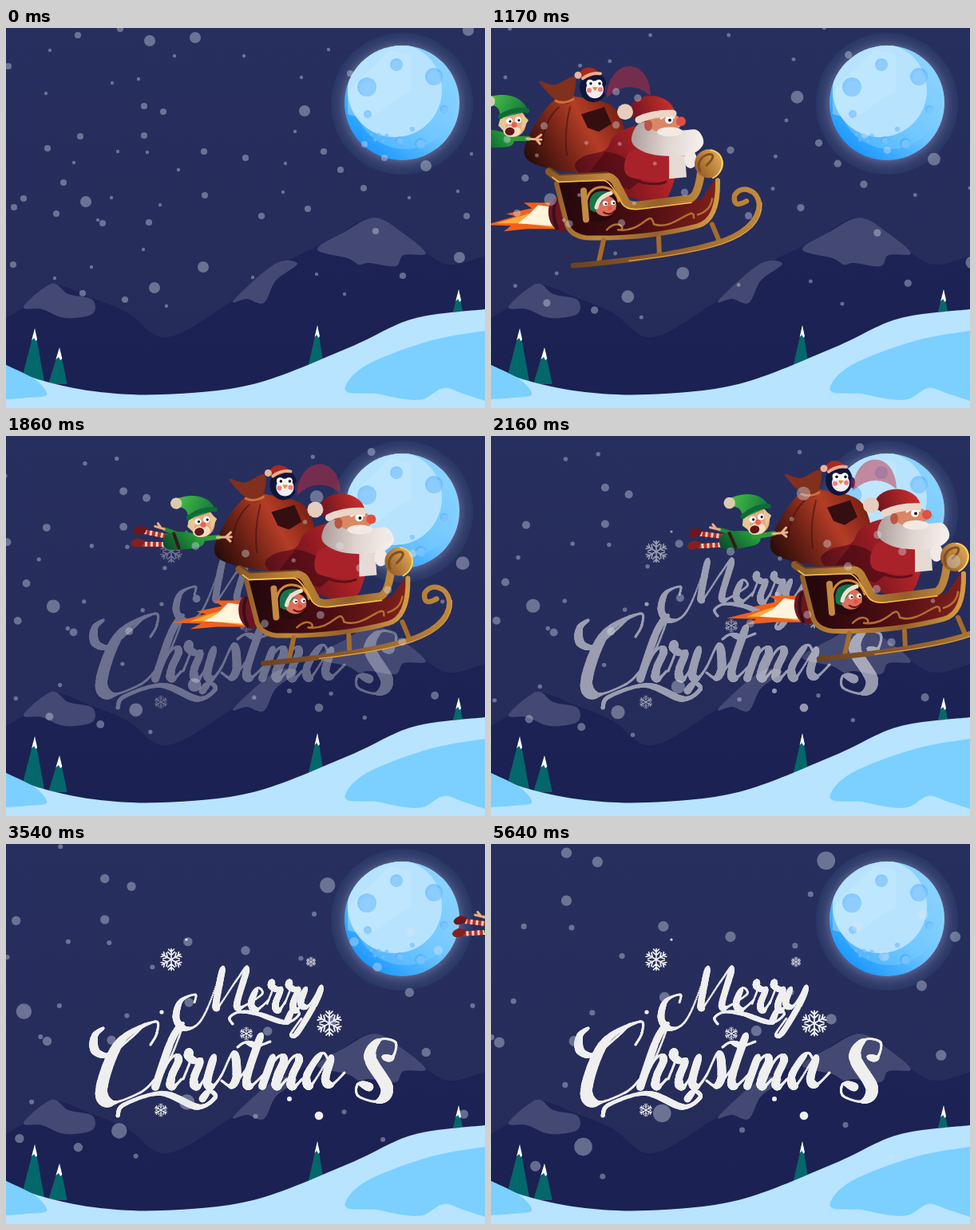
An HTML page with a canvas for the animation above (5.67 s loop, 600 px wide and 477 px high).

```html
<!DOCTYPE html>
<html lang="en">
<head>
<meta charset="utf-8">
<title>Merry Christmas</title>
<style>
html, body { margin: 0; width: 100%; height: 100%; overflow: hidden; background: #262d5b; }
canvas { display: block; }
</style>
</head>
<body>
<canvas id="stage" width="600" height="477" role="img" aria-label="Merry Christmas"></canvas>
<script>
const W = 600, H = 477, LOOP = 5670, STEP = 30, TAU = Math.PI * 2;
const stage = document.getElementById('stage').getContext('2d');
let g = stage;

function layer(draw) {
  const c = document.createElement('canvas');
  c.width = W; c.height = H;
  g = c.getContext('2d');
  draw();
  g = stage;
  return c;
}
function fill(d, color) { g.fillStyle = color; g.fill(new Path2D(d)); }
function line(d, color, width) {
  g.strokeStyle = color; g.lineWidth = width;
  g.lineCap = g.lineJoin = 'round';
  g.stroke(new Path2D(d));
}
function oval(x, y, rx, ry, color, turn = 0) {
  g.fillStyle = color;
  g.beginPath(); g.ellipse(x, y, rx, ry, turn, 0, TAU); g.fill();
}
const dot = (x, y, r, color) => oval(x, y, r, r, color);
function eye(x, y, r) { dot(x, y, r, '#fff'); dot(x + 1, y + .5, r * .4, '#111'); }
function blend(x0, y0, x1, y1, ...colors) {
  const b = g.createLinearGradient(x0, y0, x1, y1);
  colors.forEach((c, i) => b.addColorStop(i / (colors.length - 1), c));
  return b;
}
// Smooth curve through points
function curve(p, closed) {
  const n = p.length / 2, path = new Path2D();
  const at = (i, k) => p[2 * (closed ? (i + n) % n : Math.max(0, Math.min(n - 1, i))) + k];
  path.moveTo(p[0], p[1]);
  for (let i = 0; i < (closed ? n : n - 1); i++) {
    const c = (a, b, d, k) => at(a, k) + (at(b, k) - at(d, k)) / 6;
    path.bezierCurveTo(c(i, i + 1, i - 1, 0), c(i, i + 1, i - 1, 1),
      c(i + 1, i, i + 2, 0), c(i + 1, i, i + 2, 1), at(i + 1, 0), at(i + 1, 1));
  }
  return path;
}
function blob(color, ...p) { g.fillStyle = color; g.fill(curve(p, true)); }
function ground(color, ...p) {
  const path = curve(p);
  path.lineTo(W, H); path.lineTo(0, H);
  g.fillStyle = color; g.fill(path);
}
// Smooth interpolation through [time, value] keys
function ease(keys, t) {
  const n = keys.length - 1;
  if (t <= keys[0][0]) return keys[0][1];
  if (t >= keys[n][0]) return keys[n][1];
  let i = 0;
  while (t > keys[i + 1][0]) i++;
  const slope = k => {
    const a = keys[Math.max(0, k - 1)], b = keys[Math.min(n, k + 1)];
    return (b[1] - a[1]) / (b[0] - a[0]);
  };
  const [t0, v0] = keys[i], [t1, v1] = keys[i + 1];
  const d = t1 - t0, u = (t - t0) / d, w = u * u * (3 - 2 * u);
  return v0 * (1 - w) + v1 * w + d * u * (1 - u) * ((1 - u) * slope(i) - u * slope(i + 1));
}

/* ---------- landscape ---------- */
function crater(x, y, r) {
  dot(x, y, r, 'rgba(60,160,250,.42)');
  dot(x + r * .12, y + r * .15, r * .82, 'rgba(150,210,255,.5)');
}
function moon() {
  const halo = g.createRadialGradient(496, 95, 70, 496, 95, 89);
  halo.addColorStop(0, 'rgba(120,130,175,.6)');
  halo.addColorStop(.5, 'rgba(75,90,135,.45)');
  halo.addColorStop(1, 'rgba(45,80,125,.28)');
  dot(496, 95, 89, halo);
  g.save();
  g.beginPath(); g.arc(496, 94, 72, 0, TAU); g.clip();
  dot(496, 94, 73, blend(540, 40, 445, 150, '#9bd8ff', '#6fc4ff', '#1897ff'));
  oval(500, 84, 66, 68, 'rgba(120,205,255,.5)');
  dot(487, 78, 59, '#b7e3ff');
  fill('M428 108Q455 118 474 101T507 80V33L480 28L428 80Z', 'rgba(200,234,255,.4)');
  crater(489, 46, 8); crater(536, 61, 11); crater(452, 74, 12); crater(453, 108, 5);
  crater(549, 102, 5); crater(519, 145, 7); crater(493, 141, 5); crater(509, 127, 3);
  for (let i = 0; i < 5; i++) crater(457 + i * 5, 133 + (i * 7) % 13, 2.5);
  g.restore();
}
function tree(x, y, w, h) {
  fill(`M${x} ${y}l${-w} ${h}h${w * 1.7}Z`, '#04676b');
  const k = 15 * w / h;
  fill(`M${x} ${y}l${-k} 15l${k * .8} -3l2 4l${k * .5} -2Z`, '#fff');
}
const land = layer(() => {
  g.fillStyle = blend(0, 0, 0, 360, '#272f5e', '#262c5a');
  g.fillRect(0, 0, W, H);
  moon();
  ground(blend(0, 240, 0, 440, '#1d2455', '#1b2152'), 0, 364, 24, 349, 57, 322, 103, 337, 152, 357, 202, 388,
    284, 342, 348, 295, 406, 267, 462, 238, 524, 281, 557, 297, 600, 286);
  const cap = '#444973';
  blob(cap, 22, 350, 57, 321, 78, 334, 108, 341, 108, 359, 74, 364, 45, 353);
  blob(cap, 285, 342, 337, 296, 365, 296, 338, 317, 323, 345, 302, 340);
  blob(cap, 390, 278, 424, 256, 462, 238, 498, 258, 526, 283, 498, 285, 488, 299, 455, 295, 442, 297, 428, 289);
  tree(36, 377, 17, 66);
  tree(67, 401, 14, 46);
  tree(390, 373, 12, 54);
  tree(567, 328, 7, 28);
  ground('#b8e4ff', 0, 423, 40, 441, 110, 456, 196, 460, 310, 447, 430, 401, 510, 365, 600, 353);
  const ice = '#7bd0ff';
  g.fillStyle = ice;
  g.fill(curve([0, 423, 36, 441, 51, 460, 28, 464, 0, 466]));
  g.fill(curve([600, 380, 530, 393, 450, 424, 425, 455, 464, 459, 493, 465, 522, 466, 548, 452, 572, 459, 600, 468]));
});

/* ---------- lettering ---------- */
// Pen stroke: downstrokes are thick, upstrokes thin
function pen(p, thick = 11, thin = 3, ox = 0, oy = 0, size = 1) {
  const n = p.length / 2, at = (i, k) => p[2 * Math.max(0, Math.min(n - 1, i)) + k] * size + (k ? oy : ox);
  let px, py, w = thin;
  for (let i = 0; i < n - 1; i++) for (let s = 0; s <= 24; s++) {
    const u = s / 24;
    const [x, y] = [0, 1].map(k => {
      const a = at(i - 1, k), b = at(i, k), c = at(i + 1, k), d = at(i + 2, k);
      return b + u * (c - a + u * (2 * a - 5 * b + 4 * c - d + u * (3 * (b - c) + d - a))) / 2;
    });
    if (px !== undefined) {
      const dx = x - px, dy = y - py, l = Math.hypot(dx, dy) || 1;
      const push = Math.max(0, Math.min(1, (dy + .25 * dx) / l));
      w += (thin + (thick - thin) * push - w) * Math.min(1, l * .3);
    }
    dot(x, y, w / 2, '#efefef');
    px = x; py = y;
  }
}
const hump = x => pen([0, 0, 13, -29, 23, -38, 26, -31, 18, -13, 16, 0, 21, 1, 30, -8], 11, 3, x, 303);
const rune = (x, y, size) =>
  pen([0, -8, 9, -31, 11, -42, 7, -45, 6, -37, 14, -31, 22, -32, 14, -11, 14, 0, 20, 1, 29, -12], 11 * size, 3 * size, x, y, size);

function merry() {
  pen([236, 199, 237, 189, 219, 197, 213, 218, 222, 231, 238, 228, 252, 207, 272, 154], 9, 2.6);
  pen([272, 154, 267, 178, 264, 206, 288, 172, 302, 155, 289, 203, 303, 201], 9, 2.6);
  pen([303, 201, 321, 188, 315, 181, 307, 200, 314, 208, 329, 196], 9, 2.6);
  rune(327, 207, .8);
  rune(349, 207, .8);
  pen([376, 180, 369, 200, 379, 203, 395, 178, 386, 202, 364, 238, 357, 238, 370, 219], 9, 2.6);
  pen([284, 226, 280, 218, 292, 211, 315, 213, 350, 224, 367, 214, 360, 207, 352, 223], 9, 3);
}
function christmas() {
  pen([122, 231, 111, 241, 112, 260, 130, 264, 158, 242, 174, 226]);
  pen([181, 252, 189, 237, 186, 223, 143, 248, 120, 305, 130, 325, 168, 312, 186, 296], 16);
  pen([140, 341, 148, 327, 195, 313, 240, 330, 262, 318, 255, 310, 246, 320], 11, 5);
  pen([186, 297, 206, 268, 222, 225, 207, 247, 187, 305]);
  hump(190);
  rune(222, 303, 1);
  pen([261, 265, 252, 298, 259, 304, 270, 290, 285, 261, 289, 290, 282, 304, 270, 297]);
  pen([288, 300, 306, 276]);
  pen([320, 238, 302, 292, 306, 304, 323, 289]);
  pen([290, 255, 300, 249, 315, 253, 331, 248]);
  pen([335, 265, 321, 304]);
  hump(322);
  hump(341);
  pen([403, 269, 395, 263, 377, 290, 382, 303, 407, 266, 400, 295, 408, 302, 424, 287]);
  pen([472, 267, 484, 268, 488, 249, 468, 246, 456, 268, 477, 306, 466, 323, 441, 316, 441, 301, 455, 305], 16);
}
function flake(x, y, r) {
  for (let i = 0; i < 6; i++) {
    g.save();
    g.translate(x, y); g.rotate(i * TAU / 6); g.scale(r, r);
    line('M0 0V-1M-.25 -.95L0 -.7L.25 -.95M-.32 -.7L0 -.4L.32 -.7', '#efefef', .12);
    g.restore();
  }
}
const greeting = layer(() => {
  merry();
  christmas();
  flake(207, 145, 13.5); flake(405, 225, 15.5); flake(382, 148, 6);
  flake(301, 238, 8); flake(194, 334, 8);
  const white = '#efefef';
  dot(226, 120, 1.6, white); dot(195, 211, 2.6, white);
  dot(355, 320, 3, white); dot(392, 341, 5.3, white);
});

/* ---------- sleigh and riders ---------- */
function flame(t) {
  const f = Math.sin(t / 45) * 4;
  fill(`M208 212L168 212L178 219L146 226L158 229L${117 + f} 240L152 241L${140 + f} 248L172 245L207 245Z`, '#f0601c');
  fill(`M207 216L160 230L${136 - f} 238L166 238L206 243Z`, '#ffab3d');
  fill(`M207 218L186 215L172 229L${158 + f} 238L207 241Z`, '#fff4dc');
}
function sack() {
  blob(blend(172, 160, 285, 95, '#250c08', '#6e2115', '#b43d27', '#7a2013'),
    208, 82, 180, 118, 169, 152, 195, 168, 250, 174, 295, 160, 285, 97, 240, 80);
  blob('#80301c', 212, 86, 187, 60, 207, 64, 232, 54, 228, 84);
  line('M208 84Q218 89 230 82', '#d0703a', 3);
  line('M212 92Q193 110 191 140M226 92Q218 125 222 152', 'rgba(55,10,10,.5)', 2);
  fill('M240 101L269 92L278 113L262 123L248 118Z', '#350e12');
}
function penguin() {
  oval(255, 67, 17, 19, '#10153a');
  oval(272, 70, 3, 7, '#45275c');
  dot(257, 70, 11, '#f1edf2');
  eye(251, 62, 4.5); eye(262, 62, 4.5);
  dot(250, 71, 3, '#ee8078'); dot(264, 70, 3, '#ee8078');
  fill('M254 67h7l-4 5Z', '#f28a20');
  fill('M236 52Q246 34 264 49L243 57Z', '#a92a20');
  line('M242 56Q252 48 264 50', '#e7ad96', 4);
  dot(236, 52, 4.5, '#e9b49d');
}
function santa() {
  fill('M272 80C274 28 326 28 327 78Q300 55 272 80Z', 'rgba(195,45,65,.5)');
  blob(blend(240, 180, 345, 130, '#58101a', '#8d1a22', '#c4282a'),
    232, 166, 245, 153, 270, 146, 284, 126, 318, 116, 360, 140, 346, 208, 300, 205, 250, 184);
  fill('M270 148Q300 150 318 182L300 196L250 174Z', 'rgba(60,8,18,.55)');
  blob('#a9222a', 304, 146, 354, 154, 352, 183, 298, 178);
  line('M308 184Q330 192 346 186', '#5f0f1c', 3);
  blob(blend(300, 130, 392, 140, '#a99998', '#ded3cf', '#f7f1ed'),
    312, 113, 303, 134, 316, 147, 340, 153, 376, 152, 393, 138, 385, 121, 362, 121, 335, 112);
  blob('#d98767', 322, 108, 358, 102, 363, 118, 335, 123);
  oval(324, 115, 5, 7, '#bd5543');
  dot(365, 110, 6, '#e24f42');
  oval(351, 123, 16, 6, '#f4e9e2');
  eye(350, 108, 5);
  line('M340 106Q347 100 356 105', '#f7eeea', 3);
  fill('M298 100C302 70 352 72 357 98L310 108Z', blend(300, 98, 352, 82, '#6c1420', '#cb2f2c'));
  line('M312 108Q330 99 355 100', '#ecd6c8', 9);
  dot(295, 98, 10, '#e6cdbd');
  fill('M350 153h20l2 27l-22 2Z', '#e6dad5');
  oval(377, 158, 8, 11, '#f2e8e4');
}
function sleigh() {
  oval(214, 226, 15, 22, '#6c1420', -.15);
  line('M208 209Q202 226 210 244', '#34101c', 4);
  fill('M207 186L278 183L296 218L390 208L410 180Q420 228 392 240Q320 258 246 256Q224 254 219 228Z',
    blend(220, 200, 410, 220, '#25080c', '#4a0d12', '#80201b'));
  // porthole rider
  dot(264, 215, 21, '#2a0a0c');
  line('M247 208C252 186 282 188 287 210', '#cf8c37', 3);
  oval(270, 216, 14, 13, '#d9705c');
  fill('M251 221Q246 194 275 198L257 224Z', '#17744a');
  line('M259 218Q262 204 277 200', '#eee0d0', 5);
  eye(270, 213, 3); eye(280, 212, 3);
  dot(276, 219, 2.5, '#f04a3c');
  line('M268 224Q276 229 282 222', '#6c1018', 2);
  line('M243 197L246 233', '#c38a43', 8);
  line('M272 246C288 230 298 248 286 246C318 250 326 218 331 239C356 248 382 212 381 231M386 227Q402 222 404 207', '#b3702c', 2.5);
  const gold = blend(200, 180, 410, 210, '#8d5a25', '#c08739', '#94602a', '#d39b45');
  line('M209 188L221 235Q224 253 246 256Q320 258 386 241Q412 234 411 184', gold, 6);
  line('M200 173L212 182L272 179Q281 180 285 190L296 211Q301 217 314 215L376 207Q386 204 390 174', gold, 10);
  line('M204 180L212 186L268 184Q277 185 291 213Q297 222 314 220L378 212', '#f6c044', 1.6);
  line('M201 169L213 177L273 174', '#6b3f1d', 2);
  dot(400, 163, 18, blend(385, 170, 416, 150, '#9a6028', '#e4ae5a'));
  line('M389 172C378 150 422 142 397 165', '#805021', 3);
  line('M402 146C420 148 422 172 405 181', '#ffd45f', 1.8);
  line('M268 259L262 286M337 256L338 278M404 239L412 258', '#a56b2d', 6);
  line('M230 291Q350 280 408 263C440 254 463 236 463 214C461 195 440 189 432 203Q430 220 447 210',
    blend(230, 290, 464, 210, '#6d421f', '#94602c', '#c18a3c'), 6.5);
  line('M300 285Q380 276 416 264Q468 246 466 212', '#e2a449', 1.2);
}
function leg(d) {
  line(d, '#bf2c26', 6);
  g.setLineDash([3, 4]); g.lineCap = 'butt';
  g.strokeStyle = '#efd3bb'; g.stroke(new Path2D(d));
  g.setLineDash([]);
}
function elf(turn) {
  g.save();
  g.translate(186, 133); g.rotate(turn); g.translate(-186, -133);
  leg('M112 122L83 112'); leg('M112 132L78 127');
  const boot = 'l-8 -4q-8 1 -10 5q0 8 14 5Z';
  fill('M87 108' + boot, '#70151b');
  fill('M82 123' + boot, '#85201f');
  line('M131 124L108 112', '#218938', 5);
  line('M108 112L97 107M104 110L101 104', '#e8ad85', 3);
  blob(blend(110, 140, 145, 118, '#0b4e2b', '#26a13d'), 108, 120, 128, 118, 154, 127, 149, 140, 108, 137);
  line('M119 119L123 138', '#361a16', 4);
  line('M148 130L174 131', '#2f9b39', 6);
  line('M172 131L190 133M183 132L190 127M184 133L188 138', '#eab48b', 3);
  oval(156, 110, 16, 18, '#e9a880');
  fill('M141 100L137 113L144 121L148 107ZM167 99L175 108L166 121Z', '#e6c893');
  oval(154, 121, 11, 7, '#f1dfbd');
  oval(151, 121, 6, 5, '#60151a');
  eye(151, 108, 4); eye(162, 107, 4);
  dot(157, 113, 3.5, '#e66355');
  fill('M126 77C147 71 170 77 175 97L139 104Q142 87 126 87Z', blend(130, 78, 170, 102, '#46bd47', '#11763b'));
  line('M140 102Q157 92 174 96', '#0d6b38', 6);
  dot(127, 82, 7.2, '#dbcbb0');
  g.restore();
}
const ride = [[0, -505], [1170, -127], [1560, 0], [2160, 181], [2670, 317], [3540, 494], [4300, 620]];
const fade = [[1410, 0], [1560, .1], [2160, .58], [2670, .82], [3500, 1]];

function riders(t) {
  if (t > 4200) return;
  g.save();
  g.translate(ease(ride, t), (1560 - t) * .0187);
  flame(t);
  sack(); penguin(); santa(); sleigh();
  elf(-.09 - .12 * Math.cos((t - 2130) / 1400 * TAU));
  g.restore();
}

/* ---------- snow: one field growing from the centre ---------- */
const large = [180, 16, 237, 12, 374, 104, 526, 173, 100, 218, 247, 300, 186, 326, 568, 288, 579, 3];
const medium = [90, 9, 143, 1, 3, 48, 173, 98, 197, 105, 93, 136, 173, 135, 52, 151, 248, 155, 300, 163,
  398, 155, 72, 194, 249, 210, 22, 214, 10, 225, 63, 233, 121, 245, 179, 244, 320, 236, 378, 227, 448, 201,
  419, 178, 577, 236, 463, 255, 497, 311, 9, 297, 96, 333, 149, 341, 431, 57, 449, 146, 474, 163];
const small = [55, 28, 61, 314, 166, 64, 85, 169, 115, 241, 172, 278, 107, 300, 309, 313, 201, 349, 211, 35,
  298, 35, 404, 27, 133, 69, 50, 82, 370, 62, 362, 130, 140, 155, 177, 156, 216, 178, 350, 170, 347, 206,
  132, 213, 193, 222, 389, 309, 424, 334, 505, 213, 566, 205, 583, 158];

function snowfall(t) {
  const s = 1 + .618 * t / 5640;
  const drift = (p, r) => {
    for (let i = 0; i < p.length; i += 2)
      dot(300 + (p[i] - 300) * s, 238.5 + (p[i + 1] - 238.5) * s, r * s, 'rgba(220,228,240,.38)');
  };
  drift(large, 7); drift(medium, 4.1); drift(small, 2.2);
}

function frame(now) {
  const t = Math.floor(now % LOOP / STEP) * STEP;
  g.drawImage(land, 0, 0);
  g.globalAlpha = Math.max(0, Math.min(1, ease(fade, t)));
  g.drawImage(greeting, 0, 0);
  g.globalAlpha = 1;
  riders(t);
  snowfall(t);
}
let start;
function tick(now) {
  start ??= now;
  frame(now - start);
  requestAnimationFrame(tick);
}
frame(0);
requestAnimationFrame(tick);
</script>
</body>
</html>
```
